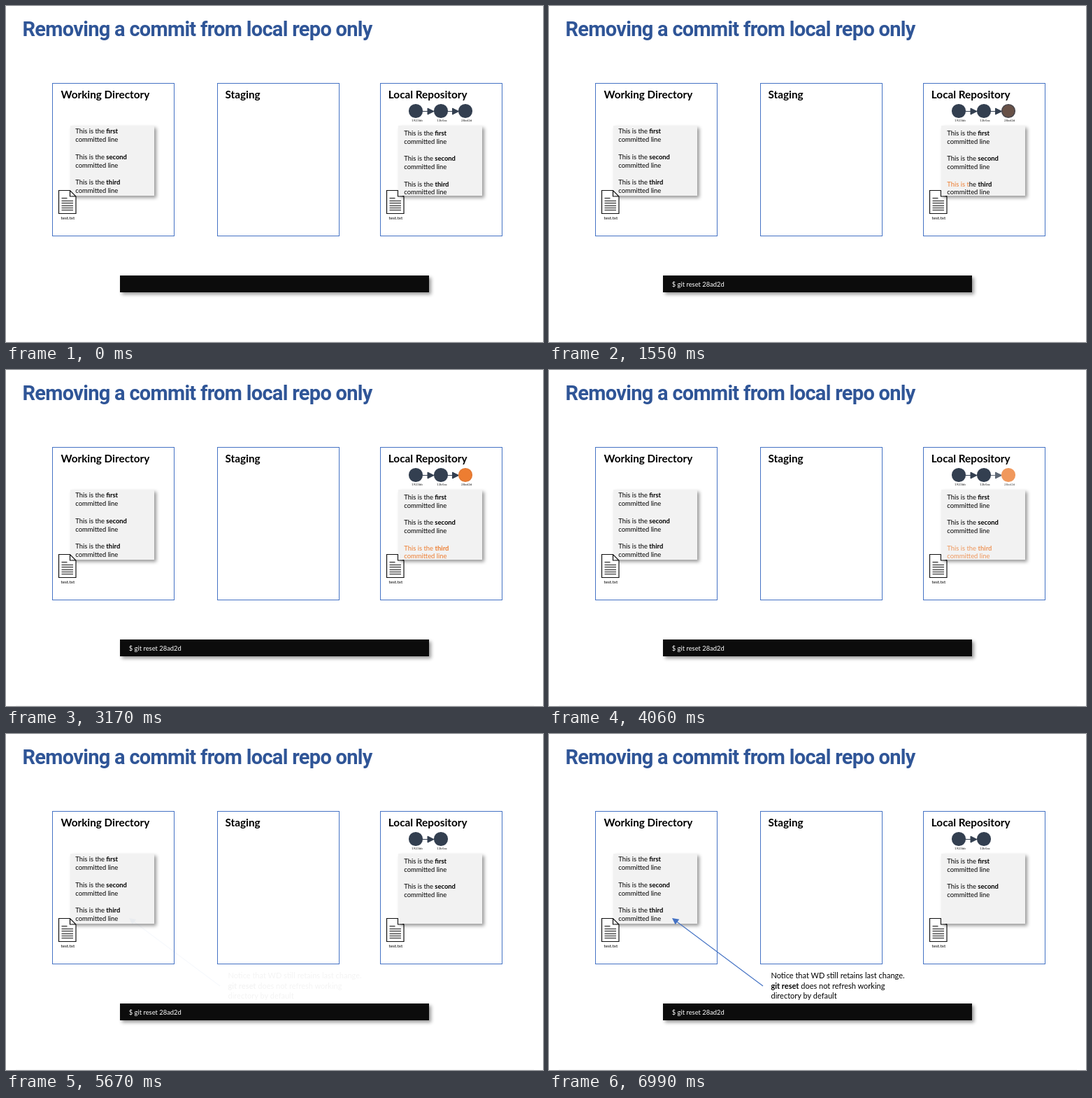
An HTML page for the animation above (8 s loop, 768x480 px).

```html
<!DOCTYPE html>
<html lang="en">
<head>
<meta charset="utf-8">
<title>Removing a commit from local repo only</title>
<style>
html, body { margin: 0; width: 768px; height: 480px; overflow: hidden; background: #fff; }
svg { display: block; font-family: Lato, sans-serif; }
text { white-space: pre; }
.title { font: 700 29px Roboto, sans-serif; letter-spacing: -.7px; fill: #2f5597; }
.head { font-size: 15.3px; font-weight: 700; }
.body { font-size: 9.4px; }
.name { font-size: 6.3px; }
.hash { font-size: 4.6px; fill: #222; }
.note { font-size: 11px; }
.b { font-weight: 700; }
.frame { fill: #fff; stroke: #4472c4; }
.page { fill: #fff; stroke: #111; stroke-width: 1.2; }
.node { fill: #333f50; stroke: #333f50; stroke-width: 1.6; }
.link { fill: #333f50; stroke: #333f50; stroke-width: 1; }
.shade { filter: drop-shadow(3px 3px 2.4px rgba(0, 0, 0, .4)); }
</style>
</head>
<body>
<svg id="stage" width="768" height="480" viewBox="0 0 768 480"></svg>
<script>
const LOOP = 8000, STEP = 60;
const DARK = [51, 63, 80], ORANGE = [237, 125, 49];
const COMMAND = "$ git reset 28ad2d";
const stage = document.getElementById("stage");

const text = (cls, x, y, s) => `<text class="${cls}" x="${x}" y="${y}">${s}</text>`;
const bold = s => `<tspan class="b">${s}</tspan>`;

const panel = (x, label, dx) =>
  `<rect class="frame" x="${x + .5}" y="110.5" width="174" height="218"/>` +
  text("head", x + dx, 132, label);

const paper = x =>
  `<rect class="shade" x="${x}" y="171" width="120" height="100" fill="#f2f2f2"/>`;

const page = x => `<g transform="translate(${x} 263.5)">
  <path class="page" d="M0 0H16L24.5 8.5V33H0Z M16 0V8.5H24.5"/>
  <path d="M4 11H12M4 15H20.5M4 18H20.5M4 22H20.5M4 25H20.5M4 28H20.5"
    stroke="#111"/></g>` + text("name", x + 3, 305, "test.txt");

const entry = (x, y, word) =>
  text("body", x, y, "This is the " + bold(word)) +
  text("body", x, y + 12, "committed line");

const letters = s => [...s].map(c => c === " " ? c : `<tspan class="ch">${c}</tspan>`).join("");

const node = (x, hash, id = "") =>
  `<circle class="node" ${id} cx="${x}" cy="150" r="9.3"/>` +
  text("hash", x - 6, 165, hash);

const link = x =>
  `<path class="link" d="M${x} 150.5H${x + 8}"/>
   <path class="link" stroke="none" d="M${x + 7} 146L${x + 16} 150.5L${x + 7} 155Z"/>`;

stage.innerHTML =
  text("title", 23.5, 43, "Removing a commit from local repo only") +
  `<path d="M14 479.5H755" stroke="#f6f6f6"/>` +
  panel(66, "Working Directory", 12.5) +
  panel(302, "Staging", 11.5) +
  panel(535, "Local Repository", 11.8) +
  paper(92) + page(75.5) +
  entry(99.3, 182.3, "first") + entry(99.3, 218.5, "second") + entry(99.3, 255.3, "third") +
  page(544.5) + paper(561) +
  entry(569.3, 185.3, "first") + entry(569.3, 221.3, "second") +
  link(596) + node(586, "1923bb") + node(622, "13b5ac") +
  `<g id="last">` + link(631.5) + node(657, "28ad2d", 'id="tip"') +
  text("body", 569.3, 258.3, letters("This is the ") + bold(letters("third"))) +
  text("body", 569.3, 269.3, letters("committed line")) + `</g>` +
  `<rect class="shade" x="163" y="385" width="442" height="24" fill="#0c0c0c"/>
   <text id="cmd" class="body" x="175.7" y="401.3" fill="#fff"></text>
   <g id="note">
   <path d="M306 360L182 267.5" stroke="#4472c4" stroke-width="1.1"/>
   <path d="M176 263L186.3 264.8L180.6 272.2Z" fill="#4472c4"/>` +
  text("note", 317.5, 349, "Notice that WD still retains last change.") +
  text("note", 317.5, 363.5, bold("git reset") + " does not refresh working") +
  text("note", 317.5, 378, "directory by default") + `</g>`;

const [last, tip, cmd, note] = ["last", "tip", "cmd", "note"].map(id => document.getElementById(id));
const chars = [...stage.querySelectorAll(".ch")];

// Progress from 0 to 1 in `count` equal steps, the first taken at `start`.
const progress = (t, start, count) =>
  Math.max(0, Math.min(count, Math.floor((t - start) / STEP) + 1)) / count;

const blend = p => `rgb(${DARK.map((d, i) => Math.round(d + (ORANGE[i] - d) * p))})`;

// The first n letters; spaces take no time.
const typed = n => n ? COMMAND.match(new RegExp(`^(\\s*\\S){${n}}`))[0] : "";

function draw(t) {
  cmd.textContent = typed(Math.round(progress(t, 530, 15) * 15));

  const fill = progress(t, 1370, 14);
  tip.style.fill = blend(fill);
  tip.style.stroke = blend(progress(t, 1370, 33));
  const lit = Math.floor(fill * chars.length);
  chars.forEach((c, i) => c.style.fill = i < lit ? "#ed7d31" : "#000");

  last.style.opacity = 1 - progress(t, 3820, 23);
  note.style.opacity = progress(t, 5670, 23);
}

function tick() {
  draw(performance.now() % LOOP);
  requestAnimationFrame(tick);
}
tick();
</script>
</body>
</html>
```
